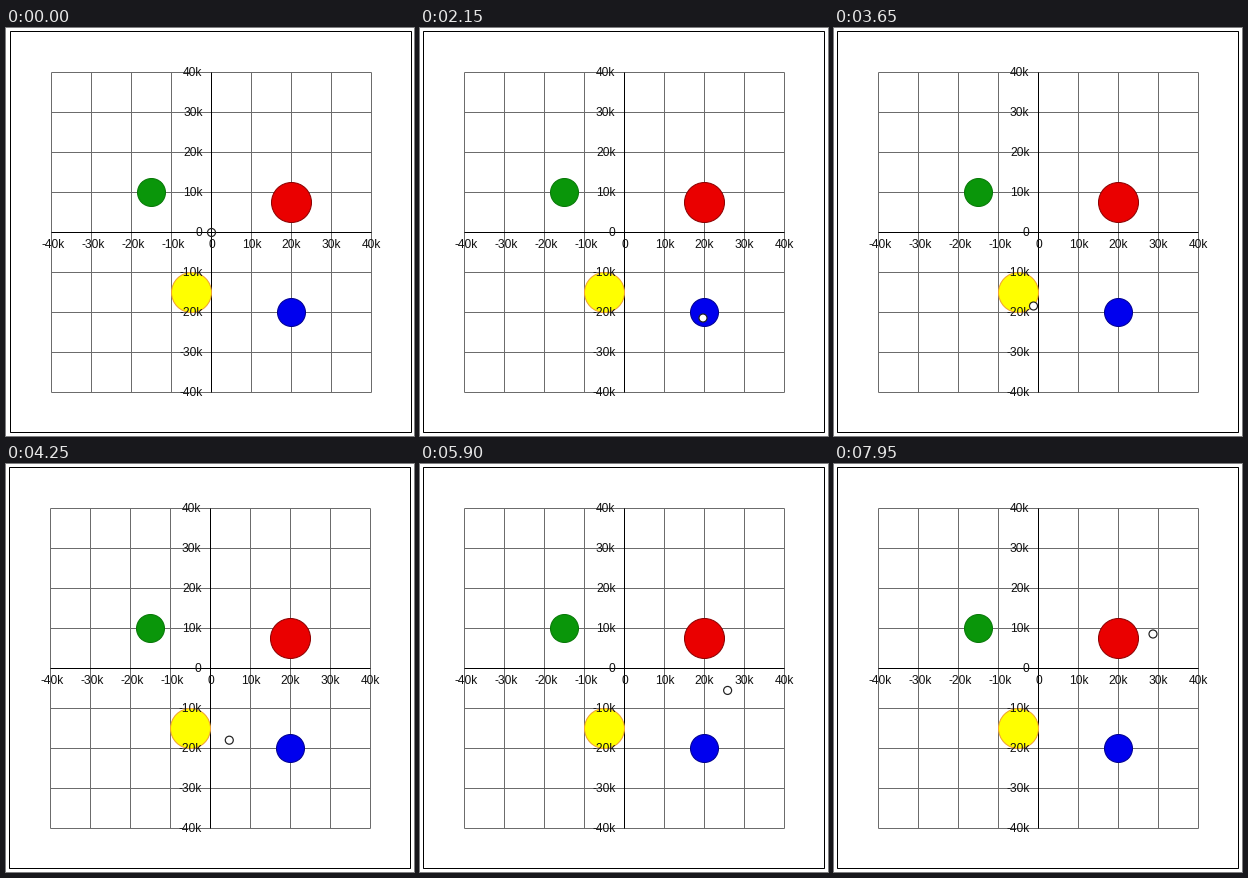
Write a matplotlib script that moves like this. It is 408 by 408 pixels and loops after 8000 ms.

```python
import matplotlib.pyplot as plt
import numpy as np
from matplotlib.animation import FuncAnimation
from matplotlib.patches import Circle, Rectangle

SIZE, DPI = 408, 100
STEP, FRAMES = 50, 160
LAUNCH = 1050           # ms; the board also moves one pixel left here
PERIOD = 610            # ms for one swing around a body
CX = CY = 204.5         # board origin in pixels
UNIT = 4                # pixels per 1k
PX = 72 / DPI           # one pixel in points

plt.rcParams["font.family"] = "Liberation Sans"
fig = plt.figure(figsize=(SIZE / DPI, SIZE / DPI), dpi=DPI, facecolor="white")
ax = fig.add_axes([0, 0, 1, 1])
ax.set_ylim(SIZE, 0)
ax.axis("off")


def line(x, y, color, z):
    ax.plot(x, y, color=color, lw=PX, zorder=z, snap=False,
            solid_capstyle="butt")


def label(x, y, text, align):
    ax.text(x, y, text, size=12 * PX, color="#111111", ha=align,
            va="baseline", zorder=5)


def draw_board():
    ax.add_patch(Rectangle((3.5, 3.5), 401, 401, fill=False, ec="black",
                           lw=PX, snap=False))
    ends = [CX - 40 * UNIT, CX + 40 * UNIT]
    for k in range(-40, 41, 10):
        color, z = ("black", 2) if k == 0 else ("#6c6c6c", 1)
        x, y = CX + k * UNIT, CY - k * UNIT
        line([x, x], ends, color, z)
        line(ends, [y, y], color, z)
        text = f"{k}k" if k else "0"
        label(x + (1.5 if k < 0 else 0), CY + 16, text, "center")
        label(CX - 9, y + 4, text, "right")


def planet(x, y, radius, fill, edge):
    """Draw a body and return its centre in pixels."""
    centre = np.array([CX + x * UNIT, CY - y * UNIT])
    ax.add_patch(Circle(centre, radius * UNIT, fc=fill, ec=edge, lw=PX,
                        zorder=3))
    return centre


draw_board()
green = planet(-15, 10, 3.5, "#0a960a", "#087808")
red = planet(20, 7.5, 5, "#ea0000", "#8c0000")
yellow = planet(-5, -15, 5, "#ffff00", "#f0a030")
blue = planet(20, -20, 3.5, "#0000ee", "#000090")

# Time, body, offset from it at that time, offset a quarter swing later
SWINGS = [
    (LAUNCH, yellow, (20, -60), (0, 0)),
    (1300, yellow, (-11, 22), (8, 26)),
    (2150, blue, (-1.5, 5.5), (22, 12)),
    (3650, yellow, (15, 13.5), (-18, 20)),
    (4900, blue, (-34.5, -2.5), (4, 14)),
    (6900, red, (-6.5, 2.5), (30, 6)),
    (7950, red, (34.5, -4.5), (2, 12)),
]


def swing_at(t, start, body, offset, quarter):
    """Ellipse around a body."""
    phase = 2 * np.pi * (t - start) / PERIOD
    return (body + np.array(offset) * np.cos(phase)
            + np.array(quarter) * np.sin(phase))


def probe_at(t):
    """Pass smoothly from one swing to the next."""
    t = max(t, LAUNCH)
    for here, after in zip(SWINGS, SWINGS[1:]):
        if t <= after[0]:
            u = (t - here[0]) / (after[0] - here[0])
            u = np.clip((u - 0.25) / 0.5, 0, 1)
            mix = u * u * (3 - 2 * u)
            return (1 - mix) * swing_at(t, *here) + mix * swing_at(t, *after)
    return swing_at(t, *SWINGS[-1])


probe = ax.add_patch(Circle((CX, CY), 4, ec="#222222", lw=1.2 * PX, zorder=6))


def update(frame):
    t = frame * STEP
    waiting = t < LAUNCH
    left = -1 if waiting else 0
    ax.set_xlim(left, left + SIZE)
    probe.set_center(probe_at(t))
    probe.set_facecolor("none" if waiting else "white")
    return [probe]


anim = FuncAnimation(fig, update, frames=FRAMES, interval=STEP,
                     repeat=True, repeat_delay=0, blit=False)
plt.show()
```
